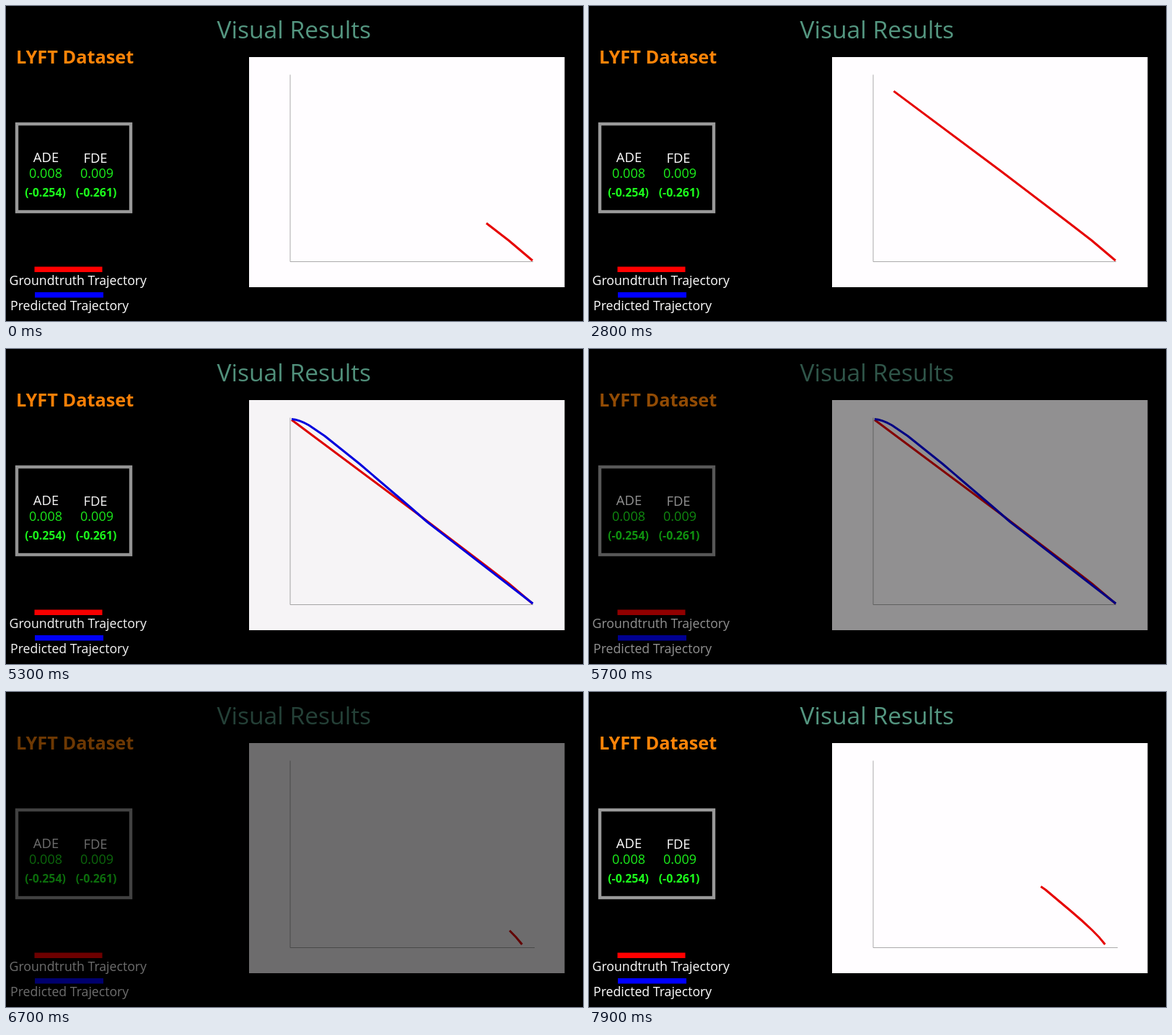
Write an HTML page that moves like this. It is 800 by 438 pixels and loops after 8000 ms.

```html
<!DOCTYPE html>
<html lang="en">
<head>
<meta charset="utf-8">
<title>Visual Results</title>
<style>
html, body { margin: 0; width: 100%; height: 100%; overflow: hidden; background: #000; }
svg { display: block; width: 100vw; height: 100vh; font-family: "Open Sans", "Noto Sans", sans-serif; }
.label { font-size: 17.7px; fill: #fff; }
.head { font-size: 18.4px; fill: #fff; }
.value { font-size: 18px; fill: #1cf01c; }
.delta { font-size: 15.9px; font-weight: 700; fill: #1cff1c; }
.line { fill: none; stroke-width: 3; stroke-linejoin: round; }
.truth { stroke: #e60000; }
.guess { stroke: #0000e6; }
</style>
</head>
<body>
<svg viewBox="0 0 800 438">
  <g id="stage">
    <text x="292.5" y="45" font-size="33.6" fill="#549680">Visual Results</text>
    <text x="14" y="79.5" font-size="25.3" font-weight="700" fill="#ff8408">LYFT Dataset</text>

    <rect x="15" y="164" width="158" height="122" fill="none" stroke="#999" stroke-width="4.4"/>
    <g text-anchor="middle">
      <text class="head" x="55.5" y="217">ADE</text>
      <text class="head" x="124" y="217.5">FDE</text>
      <text class="value" x="55" y="239">0.008</text>
      <text class="value" x="126" y="239">0.009</text>
      <text class="delta" x="54.5" y="265">(-0.254)</text>
      <text class="delta" x="125" y="265">(-0.261)</text>
    </g>

    <rect x="39.5" y="362.5" width="94" height="7.5" fill="#f00"/>
    <text class="label" x="4.5" y="388">Groundtruth Trajectory</text>
    <rect x="40" y="398" width="95" height="7.5" fill="#00f"/>
    <text class="label" x="6" y="423">Predicted Trajectory</text>

    <rect x="337" y="71" width="437.5" height="320" fill="#fffdff"/>
    <path id="axes" fill="none" stroke="#aaa"/>
    <g id="first">
      <polyline class="line truth" points="730,354 697,326 666,302 571,229.5 422,118 396,98.5"/>
      <path class="line guess" d="M730.5 354L655 295.5L584 240.5L560 219.5L490 159.5L442 121L420 106Q406 98 396 97.5"/>
    </g>
    <g id="second">
      <path class="line truth" d="M715.5 351Q708 341 697.5 331Q684 318 668 304.5L633 275L626.5 270.5"/>
    </g>
  </g>
</svg>
<script>
const LOOP = 8000, STEP = 100, CUT = 6270, FADE = 1005;
const $ = id => document.getElementById(id);
const clamp = v => Math.max(0, Math.min(1, v));

// Each trajectory is drawn at constant speed between two times (ms).
const spans = [[-757, 3104], [3400, 5100], [6370, 7900]];
const lines = [...document.querySelectorAll(".line")].map((el, i) => {
  const [from, to] = spans[i];
  return { el, from, to, length: el.getTotalLength() };
});

function draw(t) {
  const second = t >= CUT;
  $("stage").setAttribute("opacity", clamp(Math.abs(t - CUT) / FADE));
  $("first").setAttribute("visibility", second ? "hidden" : "visible");
  $("second").setAttribute("visibility", second ? "visible" : "hidden");
  $("axes").setAttribute("d", `M394 95.5V355.5H${second ? 733 : 731}`);
  for (const { el, from, to, length } of lines) {
    const shown = clamp((t - from) / (to - from)) * length;
    el.style.strokeDasharray = `${shown} ${length + 10}`;
    el.style.display = shown > 0 ? "" : "none";
  }
}

const start = performance.now();
function tick() {
  const t = (performance.now() - start) % LOOP;
  draw(Math.floor(t / STEP) * STEP);
  requestAnimationFrame(tick);
}
tick();
</script>
</body>
</html>
```
